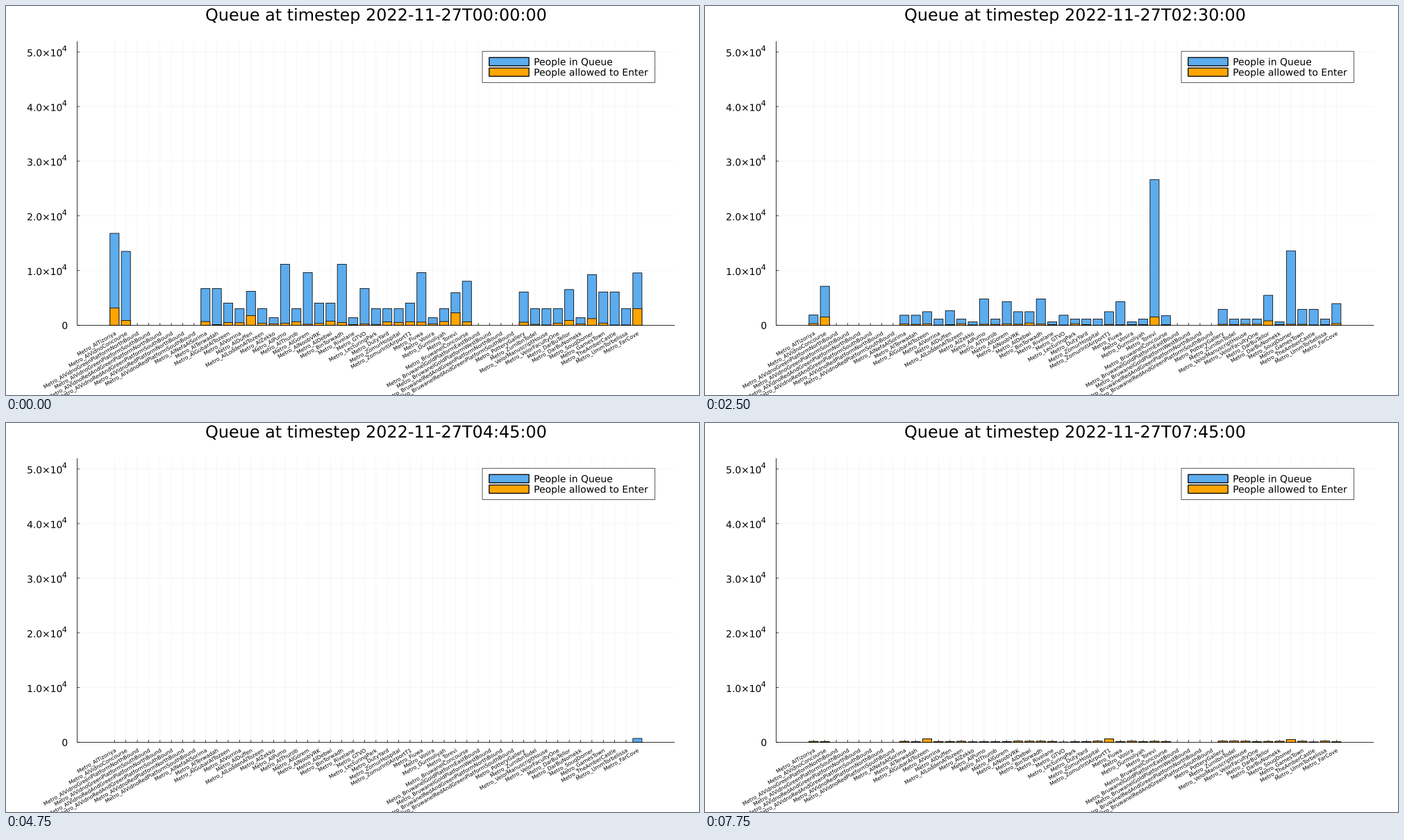
A matplotlib script for the animation above (8000 ms loop, 998 px wide and 561 px high).

```python
import matplotlib.pyplot as plt
import numpy as np
from matplotlib.animation import FuncAnimation
from matplotlib.patches import PathPatch, Rectangle
from matplotlib.textpath import TextPath
from matplotlib.transforms import Affine2D

W, H, DPI = 998, 561, 64
PX = 72 / DPI  # one pixel in points
FRAMES, INTERVAL = 32, 250

LEFT, RIGHT, TOP, BASE = 102.5, 963, 51, 460.4
X0, STEP, BAR_W = 156.3, 16.37, 13.1
TICK_DY = 78.85
BLUE, ORANGE, GRID = "#5cacee", "#ffa500", "#f4f4f4"

plt.rcParams["font.family"] = "DejaVu Sans"

BOUNDS = ["NorthBound", "SouthBound"]
VIDNO = [f"AlVidno{line}Platform{b}"
         for line in ("Green", "RedAndGreen", "Red") for b in BOUNDS]
BRUWANEL = [f"BruwanelGoldPlatform{b}" for b in ("EastBound", "WestBound")]
BRUWANEL += [f"BruwanelRedAndGreenPlatform{b}" for b in BOUNDS]

STATIONS = (
    ["AlTizoriya", "AlVidnoConcourse"] + VIDNO
    + ["AlNefaAlSorima", "AlTerwadah", "AlGubarAlTozeen", "AlVorrina",
       "AlDuffen", "AlLoddenAlTozeen", "AlZekko", "AlPumo", "AlThurob",
       "AlGorem", "AlNoobVRK", "AlDebwi", "BinTorwadh", "Rivelane", "GTVO",
       "LecturingPark", "DutyYard", "ZomurHospital", "ZomurIntlAirportT1",
       "Fiuwa", "Vosira", "Durmoliyah", "Torevi", "BruwanelConcourse"]
    + BRUWANEL
    + ["PotteryGallery", "ZurnIbnTodel", "VelorManuscriptHouse",
       "VelorFacultyOne", "DarBuTellor", "DarBuNomekk", "SouqDomer",
       "GamesTown", "TheAmberCastle", "UmmTorbelissa", "FarCove"])
N = len(STATIONS)
INDEX = {name: k for k, name in enumerate(STATIONS)}
OPEN = np.array(["Platform" not in name for name in STATIONS])
rng = np.random.default_rng(4)

# Ordinary stations drift between two queue heights (px) until closing
DRIFT = {
    (88, 76): "AlPumo BinTorwadh",
    (76, 68): "AlGorem Fiuwa",
    (53, 29): "AlNefaAlSorima AlTerwadah GTVO",
    (48, 46): "PotteryGallery GamesTown TheAmberCastle",
    (32, 39): "AlGubarAlTozeen AlNoobVRK AlDebwi ZomurIntlAirportT1",
    (11, 10): "AlZekko Rivelane Vosira DarBuNomekk",
}
# Busy stations follow their own key heights
QUEUE_STEPS = [0, 3, 7, 13, 19, 20]
BUSY = {
    "AlTizoriya": (132.5, 76.5, 29.5),
    "AlVidnoConcourse": (106.5, 174, 112.5),
    "AlDuffen": (49, 34, 29.5, 12.7),
    "Torevi": (47, 139.5, 228, 192.3),
    "BruwanelConcourse": (63.5, 54.5, 27.5),
    "DarBuTellor": (51.5, 102, 86.5),
    "SouqDomer": (73, 90.5, 121, 93.6),
    "FarCove": (75.5, 86.5, 49.5, 13, 5.5),
}
# Admitted people at the first step, late evening and closing time
ADMIT_STEPS = [0, 7, 12]
ADMIT = {"AlTizoriya": (25, 6), "AlVidnoConcourse": (7, 29.5),
         "AlDuffen": (14, 2), "AlDebwi": (6, 8), "Torevi": (18, 29.5),
         "DarBuTellor": (7, 16), "SouqDomer": (9.5, 3.5), "FarCove": (24, 6)}
# Heights that the morning rush climbs towards
OPENING, LAST, RUSH_CAP = 20, FRAMES - 1, 4.9
RUSH = {"AlGubarAlTozeen": 7.7, "ZomurIntlAirportT1": 6.7, "SouqDomer": 4}


def queue_keys(name):
    if name in BUSY:
        keys = BUSY[name]
    else:
        a, b = next((d for d, group in DRIFT.items() if name in group.split()),
                    (24, 18))
        keys = (a, a + (b - a) * 3 / 7, b)
    return np.pad(keys, (0, len(QUEUE_STEPS) - len(keys)))


queue_table = [queue_keys(name) for name in STATIONS]
admit_table = [(*ADMIT.get(name, rng.uniform(0, 5.5, 2)), 0)
               for name in STATIONS]
rush = rng.uniform(0.2, 1.7, N)
for name, peak in RUSH.items():
    rush[INDEX[name]] = peak


def heights(i):
    """Queue and admitted heights of all stations at step i."""
    queue = np.array([np.interp(i, QUEUE_STEPS, q) for q in queue_table])
    admit = np.array([np.interp(i, ADMIT_STEPS, a) for a in admit_table])
    t = max(0, (i - OPENING) / (LAST - OPENING))
    morning = np.minimum(rush * t, RUSH_CAP)
    queue = (queue + morning) * OPEN
    return queue, np.minimum(admit + morning, queue)


fig = plt.figure(figsize=(W / DPI, H / DPI), dpi=DPI, facecolor="white")
ax = fig.add_axes([0, 0, 1, 1])
ax.set_xlim(0, W)
ax.set_ylim(H, 0)
ax.axis("off")


def line(x, y, color="black", width=0.8, z=2):
    ax.plot(x, y, color=color, lw=width * PX, zorder=z, snap=False,
            solid_capstyle="butt")


def box(x, y, w, h, face, width=0.8, edge="black", z=3):
    return ax.add_patch(Rectangle((x, y), w, h, fc=face, ec=edge,
                                  lw=width * PX, zorder=z, snap=False))


def text_path(x, y, s, size, align=0.0, angle=0):
    """Outline of s; align 0, 0.5 or 1 puts its left, middle or right at x."""
    path = TextPath((0, 0), s, size=size)
    ink = path.get_extents()
    place = (Affine2D().translate(-ink.x0 - align * ink.width, 0)
             .scale(1, -1).rotate_deg(-angle).translate(x, y))
    return place.transform_path(path)


def text(*args, **kw):
    return ax.add_patch(PathPatch(text_path(*args, **kw), fc="black", lw=0,
                                  zorder=7, snap=False))


# Axes, grid and tick labels
line([LEFT, LEFT], [TOP, BASE])
line([LEFT, RIGHT], [BASE, BASE], z=5)
xs = X0 + STEP * np.arange(N)
for x, name in zip(xs, STATIONS):
    line([x, x], [TOP, BASE], GRID, z=1)
    line([x, x], [BASE - 3.5, BASE], width=0.7)
    text(x + 2.2, 474, "Metro_" + name, 7.7, align=1, angle=30)

for k in range(6):
    y = BASE - k * TICK_DY
    line([LEFT, RIGHT], [y, y], GRID, z=1)
    line([LEFT, LEFT + 3.5], [y, y], width=0.7)
    if k:
        text(80.4, y + 6.4, f"{k}.0×10", 13.85, align=1)
        text(81.2, y - 1, "4", 11.2)
    else:
        text(88.2, y + 5.4, "0", 13.85, align=1)

# Bars: the admitted part lies over the whole queue
queue_bars = [box(x - BAR_W / 2, BASE, BAR_W, 0, BLUE, z=3) for x in xs]
admit_bars = [box(x - BAR_W / 2, BASE, BAR_W, 0, ORANGE, z=4) for x in xs]

# Legend
box(686, 65.3, 248.5, 45.2, "white", edge="#333333", z=5)
for y, color, label in ((80.3, BLUE, "People in Queue"),
                        (95.4, ORANGE, "People allowed to Enter")):
    box(695.8, y - 6, 57.3, 12, color, width=1.3, z=6)
    text(761.5, y + 5.1, label, 13.93)

title = text(532.8, 21, "Queue", 23.9, align=0.5)


def update(i):
    hour, quarter = divmod(i, 4)
    label = f"Queue at timestep 2022-11-27T{hour:02d}:{quarter * 15:02d}:00"
    title.set_path(text_path(532.8, 21, label, 23.9, align=0.5))
    for bars, values in zip((queue_bars, admit_bars), heights(i)):
        for bar, h in zip(bars, values):
            bar.set_height(-h)
            bar.set_visible(h > 0.05)
    return [title, *queue_bars, *admit_bars]


anim = FuncAnimation(fig, update, frames=FRAMES, interval=INTERVAL,
                     repeat=True, repeat_delay=0, blit=False)
plt.show()
```
